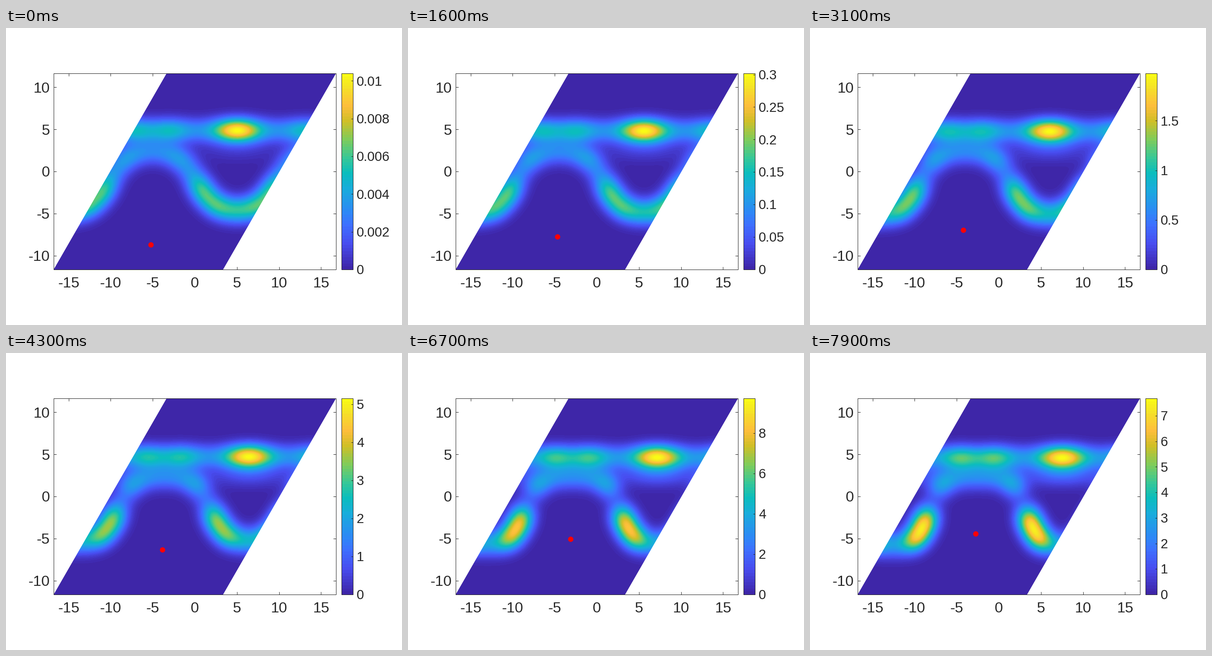
Animation of 864x648 px, one loop 8 s. Source, as a matplotlib script:

```python
import math

import matplotlib.pyplot as plt
import numpy as np
from matplotlib.animation import FuncAnimation
from matplotlib.colors import LinearSegmentedColormap
from matplotlib.patches import Circle, Polygon, Rectangle

W, H, DPI = 864, 648, 100
LEFT, RIGHT, TOP, BOTTOM = 104, 720, 99, 527
BAR_LEFT, BAR_RIGHT = 732, 757
UNIT, X_ZERO, Y_ZERO = 18.36, 412, 313
PERIOD = 369.6
HALF = PERIOD / 2
LAST = 27
INK = "#262626"
LINE = 72 / DPI

STOPS = [
    (0, "#3e26a8"), (8, "#484df0"), (14, "#3e6fff"), (18, "#2e87f7"),
    (26, "#18addb"), (31, "#0bbdbd"), (36, "#37c897"), (42, "#81cc59"),
    (48, "#d1bf27"), (53, "#febe3c"), (59, "#f5e327"), (63, "#f9fb15"),
]
CMAP = LinearSegmentedColormap.from_list(
    "density", [(i / 63, colour) for i, colour in STOPS], N=64)

# The peak density follows a cubic on a log scale
PEAK_CURVE = np.polyfit([0, 11, 19, 27],
                        np.log([0.0104, 1.978, 8.636, 7.68]), 3)

GRID_X = np.arange(LEFT, RIGHT) + 0.5
GRID_Y = np.arange(TOP, BOTTOM) + 0.5
BEADS = np.linspace(-HALF, HALF, 120, endpoint=False)
SPACING = BEADS[1] - BEADS[0]


def mix(a, b, t):
    return a + (b - a) * t


def bell(distance, sigma):
    return np.exp(-0.5 * (distance / sigma) ** 2)


def stroke(x, y, strength, sigma):
    """Soft line of round beads along a curve that repeats every PERIOD."""
    across = sum(bell(x[:, None] - BEADS - shift * PERIOD, sigma)
                 for shift in (-1, 0, 1))
    length = np.hypot(SPACING, np.gradient(y))
    weight = strength * length / (math.sqrt(2 * math.pi) * sigma)
    return (bell(GRID_Y[:, None] - y, sigma) * weight) @ across.T


def density(step):
    t = step / LAST
    x = GRID_X - (320 + 1.685 * step)
    d = np.abs(BEADS)

    # Straight band with one strong spot and a weak double one
    band = (0.28 + mix(0.25, 0.38, t * t) * bell(d - 36, 24)
            + mix(0.85, 0.80, t ** 3) * bell(HALF - d, 29))
    field = stroke(x, np.full_like(d, mix(223.5, 228, t)), band, 18)

    # Faint shelf below the strong spot
    shelf = mix(0.06, 0.18, t) * bell(HALF - d, 60)
    field += stroke(x, np.full_like(d, 267.0), shelf, 18)

    # S-shaped ridge on both sides of the axis, pulling apart into blobs
    s = (d - mix(96, 106, t)) / mix(38, 26, t)
    ridge = (0.28 + mix(0.12, 0.20, t) * bell(s + 1, 0.35)
             - mix(0.05, 0.42, t) * bell(s + 0.25, 0.25)
             + mix(0.41, 0.85, t * t) * bell(s - 0.3, 0.25)
             + mix(0.31, 0.85, t * t) * bell(s - 1.15, 0.3)
             + mix(0.28, 0.05, t) * bell(s - 2.3, 0.8))
    curve = mix(334, 345, t) + mix(66, 75, t) * np.tanh(s)
    field += stroke(x, curve, ridge, 19.5)
    return np.clip(field / field.max(), 0, 1)


def tick_step(peak):
    """Smallest 1-2-5 step giving at most eight intervals."""
    base = 10 ** math.floor(math.log10(peak / 8))
    return next(m * base for m in (1, 2, 5, 10) if peak / (m * base) <= 8)


fig = plt.figure(figsize=(W / DPI, H / DPI), dpi=DPI, facecolor="white")
ax = fig.add_axes([0, 0, 1, 1])
ax.set_axis_off()


def label(x, y, text, size, ha):
    return ax.text(x, y + 0.35 * size, text, fontsize=size * 72 / DPI, ha=ha,
                   va="baseline", family="Liberation Sans", color=INK)


def segment(xs, ys, z=1):
    return ax.plot(xs, ys, color=INK, lw=LINE, zorder=z,
                   solid_capstyle="butt")[0]


def heat(data, x0, x1):
    return ax.imshow(data, cmap=CMAP, vmin=0, vmax=1, zorder=2, aspect="auto",
                     extent=(x0, x1, BOTTOM, TOP), interpolation="nearest")


def frame_box(x0, x1):
    ax.add_patch(Rectangle((x0, TOP), x1 - x0, BOTTOM - TOP, fill=False,
                           ec=INK, lw=LINE, zorder=4))


for value in range(-15, 16, 5):
    x = X_ZERO + value * UNIT
    segment([x, x], [TOP, TOP + 6])
    segment([x, x], [BOTTOM, BOTTOM - 6])
    label(x, 555, str(value), 32.5, "center")
for value in range(-10, 11, 5):
    y = Y_ZERO - value * UNIT
    segment([LEFT, LEFT + 6], [y, y])
    segment([RIGHT, RIGHT - 6], [y, y])
    label(95.5, y, str(value), 32.5, "right")

cell = Polygon([(RIGHT - PERIOD, TOP), (RIGHT, TOP),
                (LEFT + PERIOD, BOTTOM), (LEFT, BOTTOM)],
               transform=ax.transData)
image = heat(density(0), LEFT, RIGHT)
image.set_clip_path(cell)
heat(np.linspace(1, 0, 64)[:, None], BAR_LEFT, BAR_RIGHT)
frame_box(LEFT, RIGHT)
frame_box(BAR_LEFT, BAR_RIGHT)

dot = ax.add_patch(Circle((316, 473), 5.8, fc="red", ec="none", zorder=5))
bar_labels = [label(765, 0, "", 29, "left") for _ in range(9)]
bar_ticks = [segment([BAR_RIGHT - 4.5, BAR_RIGHT], [0, 0], 4)
             for _ in range(9)]
ax.set_xlim(0, W)
ax.set_ylim(H, 0)


def update(i):
    step = (i + 2) // 3
    image.set_data(density(step))
    dot.center = (316.3 + 1.685 * step, 473.2 - 2.905 * step)
    peak = math.exp(np.polyval(PEAK_CURVE, step))
    spacing = tick_step(peak)
    for n, (text, tick) in enumerate(zip(bar_labels, bar_ticks)):
        value = n * spacing
        shown = value <= peak
        y = BOTTOM - (BOTTOM - TOP) * value / peak
        text.set_visible(shown)
        tick.set_visible(shown)
        text.set_text(f"{value:g}")
        text.set_y(y + 0.35 * 29)
        tick.set_ydata([y, y])
    return [image, dot, *bar_labels, *bar_ticks]


anim = FuncAnimation(fig, update, frames=80, interval=100, repeat=True,
                     repeat_delay=0, blit=False)
plt.show()
```
